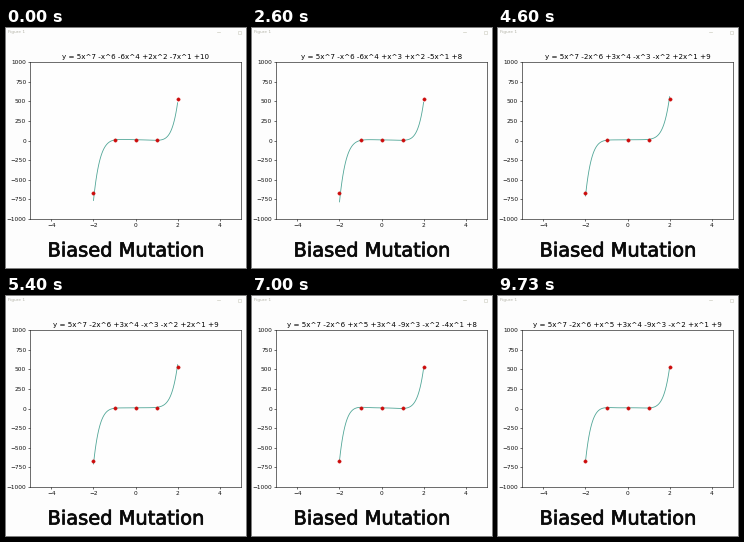
These frames come from a looping animation (240x240 px, 9790 ms). A matplotlib script:

```python
import numpy as np
import matplotlib.pyplot as plt
from matplotlib import patheffects
from matplotlib.animation import FuncAnimation
from matplotlib.patches import Rectangle

SIZE = 240
DPI = 72            # one point equals one pixel
FRAMES, INTERVAL = 178, 55
SCALE = 0.588       # the plot window is shown reduced
INK = "#111111"

# Milestones of the search; the last one passes through all points
MILESTONES = [
    "5x^7 -x^6 -6x^4 +2x^2 -7x^1 +10",
    "5x^7 -x^6 -6x^4 +x^3 +x^2 -6x^1 +7",
    "5x^7 -2x^6 +3x^4 -x^3 +x^2 -5x^1 +8",
    "5x^7 -2x^6 +3x^4 -x^3 -x^2 +2x^1 +9",
    "5x^7 -2x^6 +x^5 +3x^4 -9x^3 -x^2 -4x^1 +8",
    "5x^7 -2x^6 +x^5 +3x^4 -9x^3 -x^2 +x^1 +9",
]
PERIOD, LEAD = 1600, 250   # ms per milestone, ms already run at the start
HOLD = 0.6                 # share of a period before mutation sets in


def parse(text):
    coeffs = {}
    for part in text.split():
        factor, _, power = part.partition("x^")
        if factor in ("+", "-"):
            factor += "1"
        coeffs[int(power or 0)] = int(factor)
    return coeffs


def term(power, c):
    if power == 0:
        return f"{c:+d}"
    sign = "-" if c < 0 else "+"
    size = "" if abs(c) == 1 else abs(c)
    return f"{sign}{size}x^{power}"


def formula(coeffs):
    terms = [term(p, c) for p, c in sorted(coeffs.items(), reverse=True) if c]
    return "y = " + " ".join(terms).lstrip("+")


def poly(coeffs, x):
    return sum(c * x**p for p, c in coeffs.items())


STAGES = [parse(text) for text in MILESTONES]


def coeffs_at(ms):
    """Hold a milestone, then mutate one term after another, low powers first."""
    k, phase = divmod((ms + LEAD) / PERIOD, 1)
    k = int(k)
    if k >= len(STAGES) - 1:
        return STAGES[-1]
    old, new = STAGES[k], STAGES[k + 1]
    changed = [p for p in range(8) if old.get(p, 0) != new.get(p, 0)]
    progress = max(0, (phase - HOLD) / (1 - HOLD))
    done = int(progress * (len(changed) + 1))
    return old | {p: new.get(p, 0) for p in changed[:done]}


plt.rcParams["font.family"] = "DejaVu Sans"
fig = plt.figure(figsize=(SIZE / DPI, SIZE / DPI), dpi=DPI, facecolor="#fdfdfd")

# Stage layer in pixels, y pointing down
stage = fig.add_axes([0, 0, 1, 1])
stage.set(xlim=(0, SIZE), ylim=(SIZE, 0))
stage.axis("off")
stage.text(2, 5.5, "Figure 1", size=4.2, color="#b4b4a8")
stage.plot([211, 214], [4, 4], color="#cfcfc4", lw=0.7)
stage.add_patch(Rectangle((231.5, 2.5), 3, 3, fill=False, ec="#cfcfc4", lw=0.6))
stage.text(120, 228.5, "Biased Mutation", size=19.4, color="#0a0a0a", ha="center",
           path_effects=[patheffects.withStroke(linewidth=0.7, foreground="#0a0a0a")])

left, top, right, bottom = 24.4, 34.4, 234.7, 190.6
ax = fig.add_axes([left / SIZE, 1 - bottom / SIZE,
                   (right - left) / SIZE, (bottom - top) / SIZE],
                  facecolor="#fefefe")
ax.set(xlim=(-5, 5), ylim=(-1000, 1000),
       xticks=range(-4, 5, 2), yticks=range(-1000, 1001, 250))
ax.tick_params(labelsize=10 * SCALE, length=3.5 * SCALE, width=0.6,
               pad=3.5 * SCALE, color=INK, labelcolor=INK)
for spine in ax.spines.values():
    spine.set(linewidth=0.6, color=INK)
title = ax.set_title("", fontsize=12.2 * SCALE, pad=6 * SCALE, color="black")

xs = np.linspace(-2, 2, 100)
curve, = ax.plot(xs, 0 * xs, color="#4fa596", lw=1.4 * SCALE)
points = np.arange(-2, 3)
ax.plot(points, poly(STAGES[-1], points), "o", color="#cc0c0c",
        ms=5.6 * SCALE, mew=0.8 * SCALE)


def update(i):
    coeffs = coeffs_at(i * INTERVAL)
    curve.set_ydata(poly(coeffs, xs))
    title.set_text(formula(coeffs))
    return curve, title


anim = FuncAnimation(fig, update, frames=FRAMES, interval=INTERVAL,
                     repeat=True, repeat_delay=0, blit=False)
plt.show()
```
